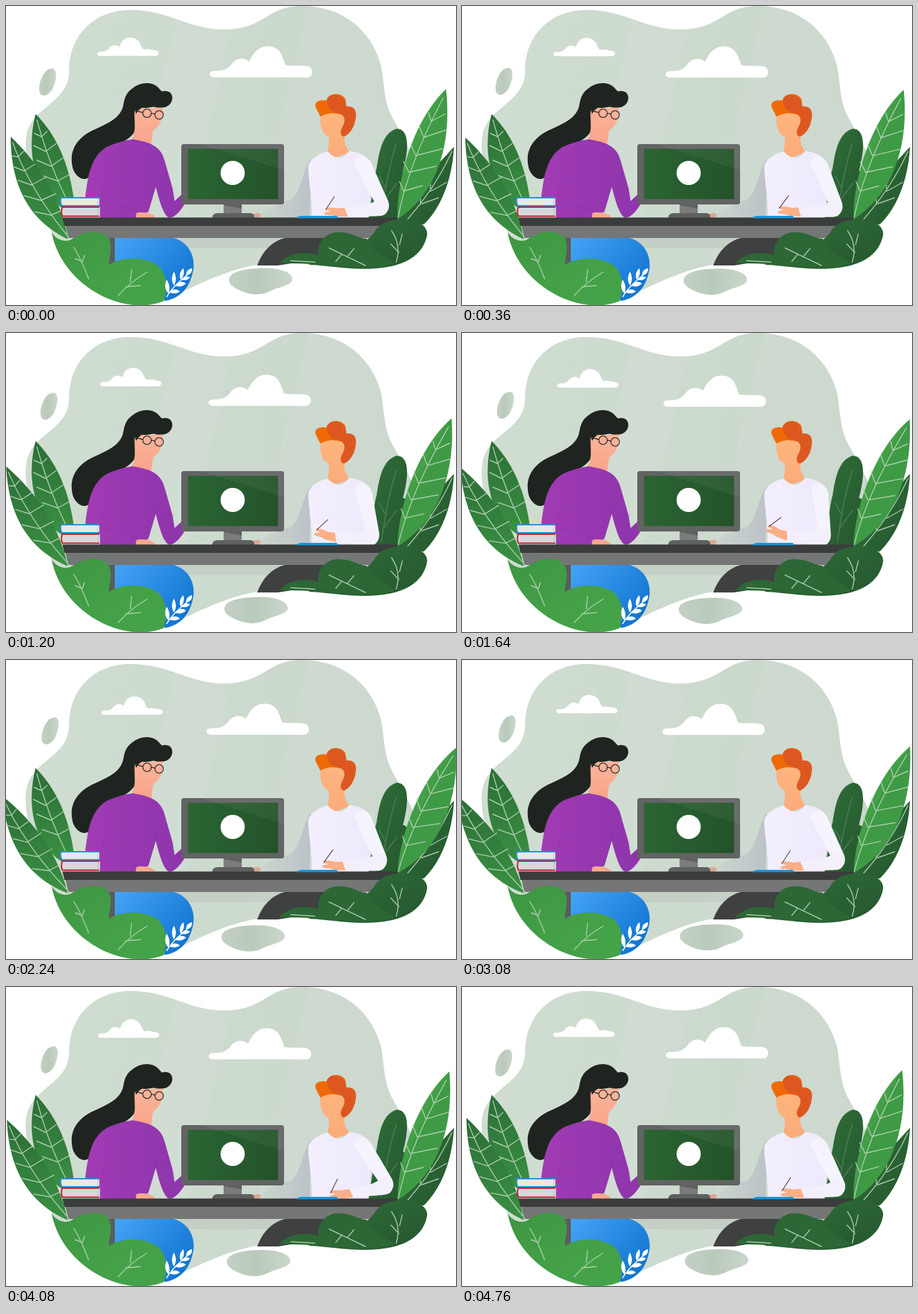
Write an HTML page that moves like this. It is 670 px wide and 446 px high and loops after 4.8 s.

```html
<!DOCTYPE html>
<html lang="en">
<head>
<meta charset="utf-8">
<title>Two people at a desk</title>
<style>
html, body { margin: 0; height: 100%; overflow: hidden; background: #fff; }
svg { display: block; width: 100vw; height: 100vh; }
.vein { fill: none; stroke: #b9d6b9; stroke-width: 1.4; stroke-linecap: round; opacity: .9; }
</style>
</head>
<body>
<svg viewBox="0 0 670 446">
  <defs>
    <linearGradient id="sky"><stop stop-color="#d0ddd1"/><stop offset="1" stop-color="#c9d6ca"/></linearGradient>
    <linearGradient id="oval"><stop stop-color="#c3d1c4"/><stop offset=".45" stop-color="#b9cabb"/><stop offset="1" stop-color="#cad6cb"/></linearGradient>
    <linearGradient id="bright" x2="1" y2="1"><stop stop-color="#3e9542"/><stop offset=".5" stop-color="#43a047"/><stop offset="1" stop-color="#45a349"/></linearGradient>
    <linearGradient id="leaf" x2="0" y2="1"><stop stop-color="#2c6d37"/><stop offset="1" stop-color="#3a9143"/></linearGradient>
    <linearGradient id="dark" x2="1" y2="1"><stop stop-color="#2f6f39"/><stop offset="1" stop-color="#25562e"/></linearGradient>
    <linearGradient id="purple"><stop stop-color="#a13bb4"/><stop offset="1" stop-color="#8d35ac"/></linearGradient>
    <linearGradient id="blue" x2="1" y2=".7"><stop stop-color="#45a4f7"/><stop offset="1" stop-color="#1174cf"/></linearGradient>
    <linearGradient id="shirt"><stop stop-color="#f3effd"/><stop offset="1" stop-color="#eee9fb"/></linearGradient>
    <linearGradient id="sleeve" x1="1" x2="0"><stop stop-color="#bcc2c9"/><stop offset="1" stop-color="#cbd6cd"/></linearGradient>
    <linearGradient id="skin" x2="0" y2="1"><stop stop-color="#fcb59b"/><stop offset="1" stop-color="#f7a48a"/></linearGradient>
    <linearGradient id="tan" x2="0" y2="1"><stop stop-color="#ffb57e"/><stop offset="1" stop-color="#faab7a"/></linearGradient>
    <linearGradient id="screen"><stop stop-color="#2b6533"/><stop offset="1" stop-color="#235329"/></linearGradient>
    <clipPath id="inside"><use href="#blob"/></clipPath>
  </defs>

  <path id="blob" fill="url(#sky)" d="M68 338C56 300 21 240 31 190C42 148 94 144 94 96C94 45 130 6 185 6C245 6 270 35 325 35C385 35 388 0 440 0C505 0 545 40 558 88C564 115 561 140 576 168C598 207 620 245 622 290C620 350 590 391 530 391C480 391 440 378 390 384C340 388 292 412 235 440C175 464 84 418 68 338Z"/>
  <g clip-path="url(#inside)" fill="#fff" opacity=".06">
    <path d="M258 0H345L240 446H150ZM450 0H640L560 446H345Z"/>
  </g>

  <path id="cloudA" fill="#fff" d="M140 74.500C134 74 134 68 141 68C149 68 151 66 154 62C159 57 166 58 169 61C172 48 183 44 193 49C201 53 200 61 205 65C212 63 216 66 222 66C229 67 229 74 222 74.500Z"/>
  <path id="cloudB" fill="#fff" d="M309 106.500C301 105 302 97 310 97C325 97 331 94 338 84C346 76 357 78 362 83C367 73 374 60 390 60C408 60 411 74 416 88C425 90 440 88 450 90C458 93 458 104 450 106.500Z"/>
  <path id="ovalA" fill="url(#oval)" d="M70 93.500C77 96 75 112 69 124C63 134 53 137 50 129C47 118 54 101 61 96C64 94 67 93 70 93.500Z"/>
  <path id="ovalB" fill="url(#oval)" d="M332 409C332 395 360 391 387 391C412 391 430 400 426 410C421 418 405 419 392 426C380 432 364 431 350 425C341 421 332 416 332 409Z"/>

  <!-- Plants behind the desk -->
  <path fill="url(#dark)" d="M538 316C546 292 546 262 552 241C556 215 561 189 582 183C602 184 599 216 591 246C607 250 603 285 584 318Z"/>
  <path class="vein" style="opacity:.25" d="M559 312Q567 250 581 205M565 271L556 254M563 290L582 264"/>
  <path fill="url(#dark)" d="M583 320C594 284 640 240 667 210C665 252 651 298 622 326Z"/>
  <path class="vein" d="M598 318Q640 270 664 217M632 276V250M617 296V273M633 276L656 263M619 295L644 286"/>
  <g id="leafR">
    <path fill="#43a047" d="M583 318C581 262 605 172 655 124C663 192 650 274 583 318Z"/>
    <path fill="#378b40" opacity=".3" d="M583 318C590 250 625 175 655 124C663 192 650 274 583 318Z"/>
    <path class="vein" d="M584 315Q598 238 651 137M633 172L629 159M622 196L615 179M610 223L602 205M600 248L592 232M592 276L586 262M633 172L654 161M622 196L655 185M610 223L650 213M600 248L640 239M592 276L620 268"/>
  </g>
  <path fill="url(#leaf)" d="M44 161C76 193 94 237 101 288L88 304C46 280 28 225 44 161Z"/>
  <path class="vein" d="M46 170Q64 235 89 286M53 195L42 190M59 217L41 208M67 239L46 230M77 261L54 253M53 195L61 187M59 217L75 205M67 239L86 226M77 261L95 251"/>
  <g id="leafL">
    <path fill="url(#leaf)" d="M7 195C44 230 82 283 92 348C32 319 7 265 7 195Z"/>
    <path class="vein" d="M10 204Q36 274 90 341M18 225L10 224M27 246L12 240M38 267L18 260M52 290L27 283M67 312L43 307M18 225L26 217M27 246L43 236M38 267L60 255M52 290L74 280M67 312L85 304"/>
  </g>

  <!-- Woman -->
  <path fill="#1f2420" d="M190 152C180 141 179 131 188 123C202 111 224 112 231 128C242 124 250 131 247 141C244 151 232 154 222 150L197 154C200 178 193 194 171 204C145 216 139 226 129 249C122 263 107 260 100 244C93 220 102 199 128 186C152 175 172 167 175 146C177 134 181 128 188 123Z"/>
  <path fill="url(#skin)" d="M193 148C207 155 220 152 233 150C235 167 230 178 219 186L216 207L186 201C197 183 188 168 193 148Z"/>
  <path fill="#1f2420" d="M190 151C185 134 201 117 216 118C230 120 232 131 246 139C241 153 228 153 220 150C211 147 198 151 194 161Z"/>
  <g fill="none" stroke="#322f30" stroke-width="1.300"><circle cx="210" cy="160" r="6.300"/><circle cx="228" cy="162.500" r="6.300"/><path d="M216 161Q219 159 222 162M204 159L193 156"/></g>
  <path fill="url(#purple)" d="M118 285C122 250 128 216 160 206C175 201 183 199 190 199C211 203 230 207 236 230L248 272L251 291L265 278L267 294C259 307 251 316 243 316C234 312 228 289 223 270L212 307L195 316H140V300Z"/>
  <path fill="none" stroke="#7a2b9a" opacity=".4" d="M151 254L142 286M222 258V270M142 290L193 305"/>
  <path fill="#f5a98e" d="M194 309C203 306 219 309 222 315L220 317H193Z"/>

  <!-- Man -->
  <path fill="url(#sleeve)" d="M454 228C442 242 438 283 423 289C405 296 382 302 375 313L400 317H452Z"/>
  <path fill="#dca894" d="M367 311Q374 306 380 311L377 316H367Z"/>
  <path fill="url(#tan)" d="M468 157H505V187C504 191 503 194 505 207L512 219L482 228L478 219C482 206 481 196 480 195C469 190 467 178 468 157Z"/>
  <path fill="#ef6a06" d="M461 151C458 142 469 139 477 141C481 128 499 129 505 138C507 146 507 153 499 162C489 159 478 159 468 165Z"/>
  <path fill="#dc5820" d="M478 139C484 128 505 130 507 150C516 149 522 154 521 164C520 180 512 191 503 195C498 193 497 188 500 182C507 170 505 161 491 159C484 158 477 151 478 139Z"/>
  <path fill="url(#shirt)" d="M450 242C449 230 466 220 479 217Q496 236 511 216C532 219 545 228 546 244L540 316H455C456 288 451 266 450 242Z"/>
  <g id="upperArm">
    <path fill="#f5f3fd" d="M518 235C520 220 541 222 546 239L569 291C573 302 567 311 558 313C549 312 549 303 550 295Z"/>
    <g id="forearm">
      <path fill="#f3f0fc" d="M556 287C568 286 574 302 564 311C558 315 538 313 507 314L501 301C518 299 538 300 556 287Z"/>
      <g id="hand">
        <path fill="#fbaf86" d="M509 314H491C486 311 481 313 474 311L475 308L483 306C479 305 475 304 475 302C479 299 488 301 493 302L504 301Z"/>
        <path fill="none" stroke="#514655" stroke-width="1.200" d="M489 284L476 304"/>
      </g>
    </g>
  </g>

  <!-- Monitor -->
  <path fill="#7b7c7c" d="M324 292H351V311H324Z"/>
  <path fill="#5f6060" d="M324 295H351V302L324 297ZM307 316Q307 310 314 309H365Q370 310 370 316Z"/>
  <rect x="261" y="206" width="153" height="90" rx="4" fill="#626363"/>
  <rect x="271" y="213" width="134" height="75" fill="url(#screen)"/>
  <path fill="#fff" opacity=".05" d="M290 206H410Q414 206 414 210V245Z"/>
  <circle cx="337.500" cy="249" r="18" fill="#fff"/>

  <!-- Desk, legs and books -->
  <path fill="#c2cec5" opacity=".8" d="M162 346H540V361H162Z"/>
  <path fill="#3f4040" d="M374 387C382 365 398 348 421 345H500V372L405 387Z"/>
  <path fill="url(#blue)" d="M162 345H246C270 350 282 370 279 393C274 421 260 435 237 440L200 400L162 386Z"/>
  <path fill="#5b5c5c" d="M149 340H162V388H149Z"/>
  <path fill="#757676" d="M88 326H575L548 346H93Z"/>
  <path fill="#3b3c3c" d="M84 315.500H583V328H87Z"/>
  <path fill="#1596dd" d="M433 315L438 313H492L495 315.500V316.500H432Z"/>
  <g stroke-width="2">
    <path fill="#e5e9ee" stroke="#278fcf" d="M139 286H82Q80 292 83 298H139"/>
    <path fill="#d7d8dc" stroke="#c41e30" d="M139 300H84Q81 307 84 313.500H139"/>
    <path stroke="#b2bbc5" stroke-width="1" d="M137 287V297M137 301V312"/>
  </g>

  <!-- Front bushes -->
  <path fill="url(#dark)" d="M520 360C533 354 541 347 548 338C557 322 577 317 594 318C615 319 628 329 627 341C622 371 594 392 535 392C500 392 470 386 450 386Z"/>
  <path fill="#2c6735" d="M407 384C418 369 447 364 465 372C462 347 484 334 502 338C516 339 525 347 537 347C542 367 565 371 579 384C542 399 470 382 407 384Z"/>
  <path class="vein" d="M574 335Q589 357 581 382M586 356L590 340M585 368L573 355M481 361L535 387M500 370L491 381M508 374L518 362M424 380L460 382"/>
  <path fill="url(#bright)" d="M68 338C76 350 90 354 101 346C119 333 151 333 155 352C158 365 153 377 153 386C174 372 214 374 229 390C241 405 240 423 235 440C175 464 84 418 68 338Z"/>
  <path class="vein" d="M101 360Q113 380 123 407M113 383L117 372M111 380L103 377M210 397Q187 410 167 432M185 411L187 393M178 419L200 417"/>
  <g fill="#fff">
    <path fill="none" stroke="#fff" stroke-width="1.500" d="M239 434Q250 416 275 397"/>
    <path d="M242 429Q234 421 239 408Q246 418 242 429ZM250 417Q244 407 250 396Q256 407 250 417ZM260 408Q256 399 264 391Q267 401 260 408ZM268 402Q268 393 277 391Q278 400 268 402ZM243 427Q251 419 259 426Q251 431 243 427ZM251 417Q260 408 268 414Q261 421 251 417ZM260 408Q268 401 274 405Q269 411 260 408Z"/>
  </g>
</svg>
<script>
const LOOP = 4800;
const armKeys = [[0, 0], [760, -8], [1640, -21], [2240, -3], [3080, 0], [4080, 7], [LOOP, 0]];

const set = (id, transform) => document.getElementById(id).setAttribute("transform", transform);
const move = (id, x, y, k) => set(id, `translate(${x * k} ${y * k})`);
const turn = (id, angle, x, y) => set(id, `rotate(${angle} ${x} ${y})`);

// Out and back once per loop, turning at the peak time.
const swing = (t, peak) => t < peak ? t / peak : (LOOP - t) / (LOOP - peak);
const ease = k => (1 - Math.cos(Math.PI * k)) / 2;

function keyed(keys, t) {
  const i = keys.findIndex(key => key[0] > t);
  const [t0, a] = keys[i - 1], [t1, b] = keys[i];
  return a + (b - a) * (t - t0) / (t1 - t0);
}

function draw(t) {
  move("cloudA", 6.5, 7.5, ease(swing(t, 2000)));
  move("cloudB", -5.5, 5.5, ease(swing(t, 2800)));
  move("ovalA", 5.5, -11, swing(t, 3200));
  move("ovalB", -12, 5, swing(t, 2100));
  turn("leafL", -6 * swing(t, 2800), 92, 348);
  turn("leafR", 5 * swing(t, 2400), 583, 318);

  const reach = keyed(armKeys, t);
  turn("upperArm", -0.95 * reach, 530, 240);
  turn("forearm", 0.4 * reach, 556, 300);
  turn("hand", -0.4 * reach, 506, 307);
}

const start = performance.now();
function frame() {
  draw((performance.now() - start) % LOOP);
  requestAnimationFrame(frame);
}
frame();
</script>
</body>
</html>
```
